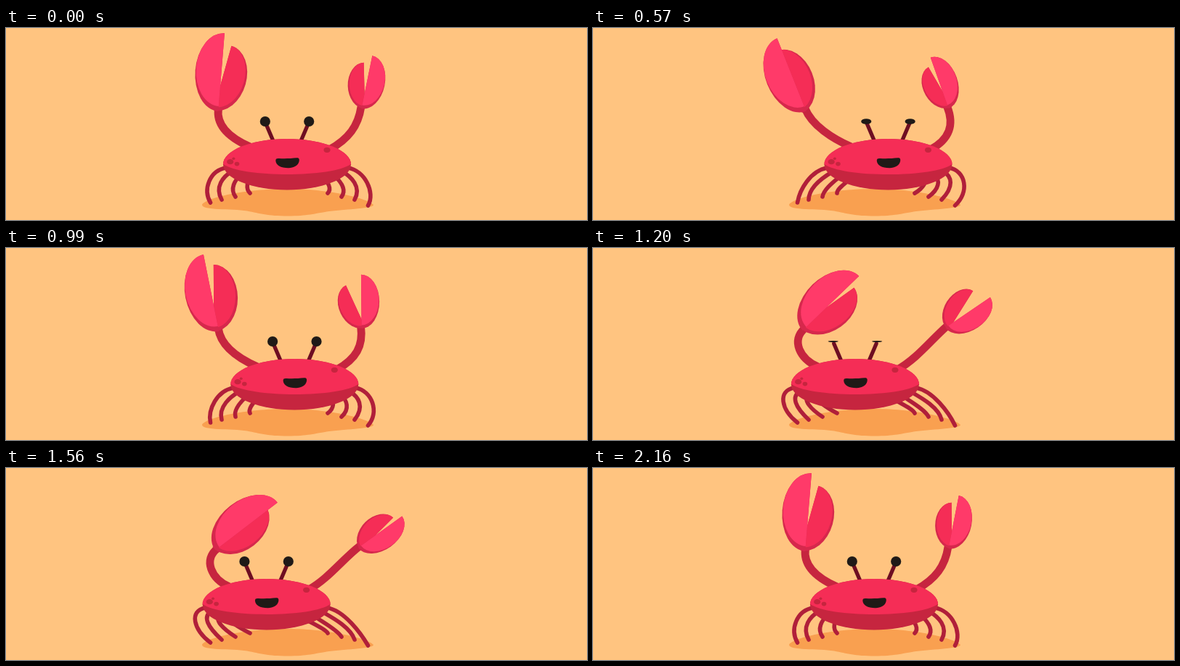
Write an HTML page with a canvas that moves like this. It is 800x265 px and loops after 2190 ms.

```html
<!DOCTYPE html>
<html lang="en">
<head>
<meta charset="utf-8">
<title>Dancing crab</title>
<style>
html, body { margin: 0; width: 100%; height: 100%; overflow: hidden; background: #ffc480; }
canvas { display: block; width: 800px; height: 265px; }
</style>
</head>
<body>
<canvas id="stage" width="800" height="265"></canvas>
<script>
const ctx = document.getElementById('stage').getContext('2d');
const LOOP = 2190, STEP = 30, REST = 387;
const RED = '#f52d56', PINK = '#ff3a69', DARK = '#c6253f', RIM = '#d6284c',
      LEG = '#b01f3a', STALK = '#6e0e22', BLACK = '#1f1a17';

// Keys are [time, value] pairs
const SWAY = [[0, REST], [190, REST], [780, 413], [1366, 351.5], [1972, REST], [LOOP, REST]];
const LEFT_GRIP = [[0, 11], [30, 11], [575, 0], [960, 11], [1040, 11], [1540, 0], [1860, 10], [LOOP, 11]];
const RIGHT_GRIP = [[0, 13], [210, 25], [620, 10], [1090, 26], [1570, 9], [1800, 13.5], [2130, 10], [LOOP, 13]];
const BLINKS = [600, 1200];

// Outermost leg first; give is how much the bend follows the body
const LEGS = [
  { hip: 84, hipY: 193, reach: 23, drop: 4, bend: 10.5, rise: 18, give: 1, left: [281.5, 241], right: [498.5, 245] },
  { hip: 76, hipY: 198, reach: 12, drop: 7, bend: 10, rise: 18, give: 0.75, left: [297, 237], right: [480, 237] },
  { hip: 64, hipY: 203, reach: 8, drop: 7, bend: 8, rise: 11, give: 0.7, left: [316, 233], right: [462, 233] },
  { hip: 50, hipY: 206, reach: 4, drop: 5, bend: 7, rise: 7, give: 0.5, left: [336, 228], right: [443, 228] }
];

const smooth = u => u * u * (3 - 2 * u);
const swing = u => {
  const a = Math.pow(u, 1.84), b = Math.pow(1 - u, 1.84);
  return a / (a + b);
};

function track(keys, t, ease) {
  let i = 1;
  while (i < keys.length - 1 && t > keys[i][0]) i++;
  const [t0, v0] = keys[i - 1], [t1, v1] = keys[i];
  return v0 + (v1 - v0) * ease((t - t0) / (t1 - t0));
}

function ellipse(x, y, rx, ry, color) {
  ctx.beginPath();
  ctx.ellipse(x, y, rx, ry, 0, 0, Math.PI * 2);
  ctx.fillStyle = color;
  ctx.fill();
}

function curve(points, width, color) {
  ctx.beginPath();
  ctx.moveTo(points[0], points[1]);
  ctx.bezierCurveTo(...points.slice(2));
  ctx.lineWidth = width;
  ctx.strokeStyle = color;
  ctx.stroke();
}

function halfEllipse(x, y, rx, ry, leftSide, color) {
  ctx.beginPath();
  ctx.ellipse(x, y, rx, ry, 0, -Math.PI / 2, Math.PI / 2, leftSide);
  ctx.closePath();
  ctx.fillStyle = color;
  ctx.fill();
}

function turned(degrees, draw) {
  ctx.save();
  ctx.rotate(degrees * Math.PI / 180);
  draw();
  ctx.restore();
}

function claw(x, y, sx, sy, angle, grip) {
  ctx.save();
  ctx.translate(x, y);
  ctx.scale(sx, sy);
  turned(angle + grip * 0.65, () => {
    halfEllipse(-6, -42, 33, 46, false, RIM);
    halfEllipse(-6, -44.5, 30, 43.5, false, RED);
  });
  turned(angle - grip * 0.35, () => {
    halfEllipse(0, -50, 36, 54, true, RIM);
    halfEllipse(0, -53.5, 35, 50.5, true, PINK);
  });
  ctx.restore();
}

function arm(px, py, angle, length, sx, sy, bx, by) {
  const a = angle * Math.PI / 180;
  curve([px, py, px - Math.sin(a) * length, py + Math.cos(a) * length,
    sx + bx, sy + by, sx, sy], 10.8, DARK);
}

function leg(x, side, spec) {
  const [fx, fy] = side < 0 ? spec.left : spec.right;
  const hx = x + side * spec.hip;
  const stretch = side * (REST - x);
  const pull = (0.6 * stretch + 0.005 * stretch * stretch) * spec.give;
  curve([hx, spec.hipY, hx + side * spec.reach, spec.hipY + spec.drop,
    fx + side * (spec.bend - pull), fy - spec.rise, fx, fy], 5.6, LEG);
}

function shadow() {
  ctx.fillStyle = '#f9a050';
  ctx.fill(new Path2D('M270 244C275 234 330 222 388 222C446 222 500 236 506 244' +
    'C506 249 470 250 445 253C425 256 415 259.5 388 259.5C360 259.5 350 256 332 252.5C310 249 270 252 270 244Z'));
}

// Drawn around x = 0
function body() {
  ctx.save();
  ctx.beginPath();
  ctx.ellipse(0, 188.2, 88, 35.2, 0, 0, Math.PI * 2);
  ctx.fillStyle = DARK;
  ctx.fill();
  ctx.clip();
  ctx.fillStyle = RED;
  ctx.fill(new Path2D('M-89 187C-66 207 66 207 89 187V150H-89Z'));
  ctx.restore();
  ellipse(-78.3, 184.7, 4.6, 3.6, DARK);
  ellipse(-69, 187.6, 3.3, 2.8, DARK);
  ellipse(-73.6, 180.2, 2, 1.7, DARK);
  ellipse(55, 168.3, 4.5, 3.6, DARK);
  ctx.fillStyle = BLACK;
  ctx.fill(new Path2D('M-15.7 183C-15.7 180 -13.5 179.8 -11 180C-3 180.6 6 180 13 179.3' +
    'C16.5 179 17.2 181 16.6 184C15.4 190 9 193.2 2 193.2C-9 193.2 -15.4 189.5 -15.7 183Z'));
}

function eyes(t) {
  const open = Math.min(1, ...BLINKS.map(b => Math.abs(t - b) / 55));
  for (const side of [-1, 1]) {
    ctx.beginPath();
    ctx.moveTo(side * 29.2, 132);
    ctx.lineTo(side * 19, 156);
    ctx.lineWidth = 5.3;
    ctx.strokeStyle = STALK;
    ctx.stroke();
    ellipse(side * 30.2, 129, 7.1, Math.max(0.9, 7.1 * open), BLACK);
  }
}

function draw(t) {
  const x = track(SWAY, t, swing), dx = x - REST;
  const tilt = 8.5 - 1.55 * dx;
  const leftX = 292.5 - dx * dx * 0.0015, rightX = 490 - dx * dx * 0.0035;

  ctx.fillStyle = '#ffc480';
  ctx.fillRect(0, 0, 800, 265);
  shadow();

  ctx.lineCap = 'round';
  for (const spec of LEGS) {
    leg(x, -1, spec);
    leg(x, 1, spec);
  }
  arm(leftX, 111, tilt, 25.5, x - 51, 164, -25, -11);
  arm(rightX - 1, 108.5, tilt, 27, x + 58, 168, 27, -15);
  claw(leftX, 111, 1, 1, tilt, track(LEFT_GRIP, t, smooth));
  claw(rightX, 108.5, -0.69, 0.69, 1.5 - tilt, track(RIGHT_GRIP, t, smooth));

  ctx.save();
  ctx.translate(x, 0);
  eyes(t);
  body();
  ctx.restore();
}

const start = performance.now();
function tick() {
  const t = (performance.now() - start) % LOOP;
  draw(Math.floor(t / STEP) * STEP);
  requestAnimationFrame(tick);
}
tick();
</script>
</body>
</html>
```
